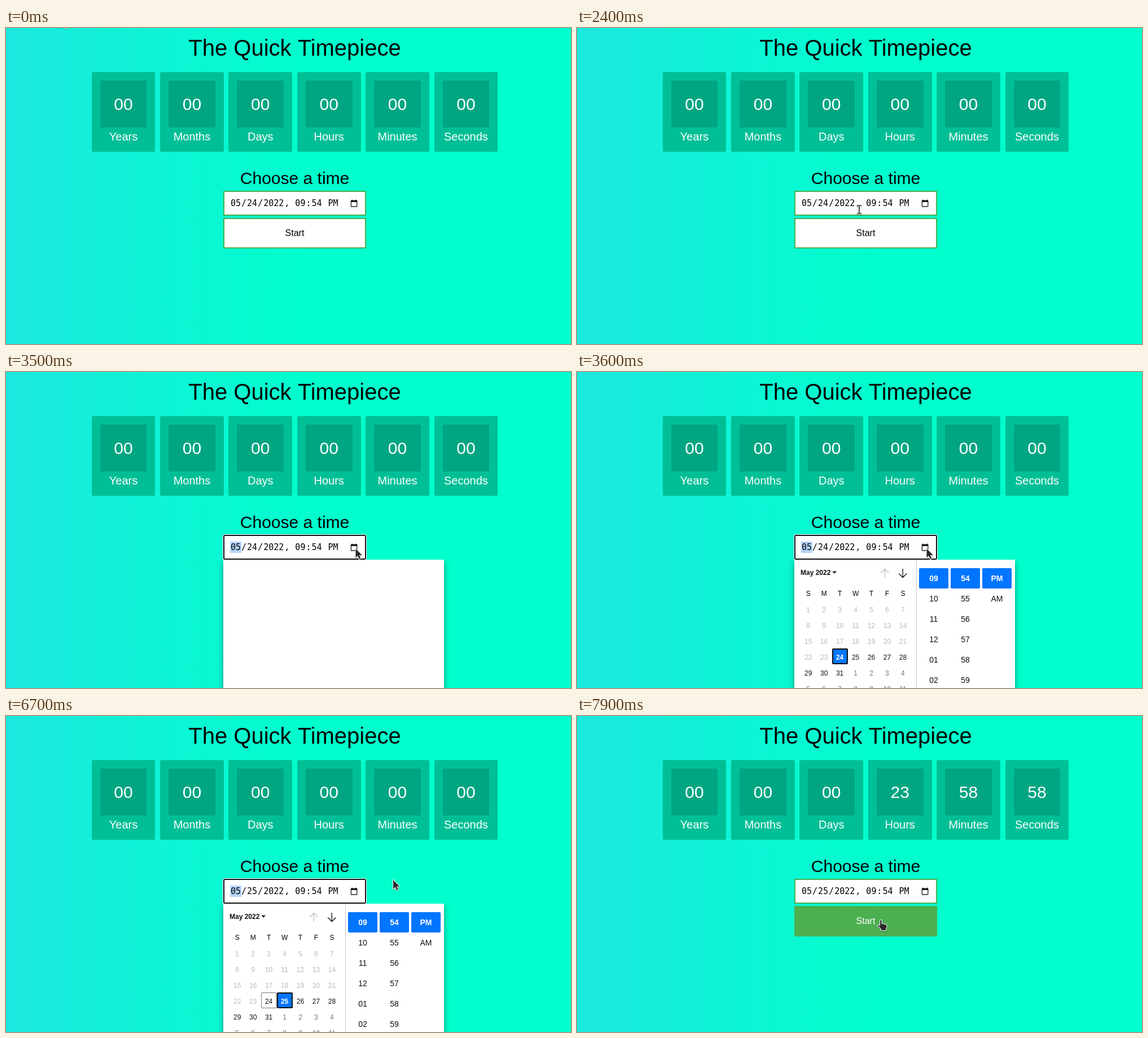
An HTML page with a canvas that plays this animation: 1001 px wide and 559 px high, repeating every 8 s.

```html
<!DOCTYPE html>
<html lang="en">
<head>
<meta charset="utf-8">
<title>Countdown page</title>
<style>
html, body { margin: 0; width: 100%; height: 100%; overflow: hidden; background: #00ffcc; }
canvas { display: block; }
</style>
</head>
<body>
<canvas id="stage" width="1001" height="559"></canvas>
<script>
const ctx = document.getElementById('stage').getContext('2d');
const LOOP = 8000, STEP = 100;
const SANS = '"Liberation Sans", Arial, sans-serif';
const MONO = '"DejaVu Sans Mono", monospace';
const GREEN = '#4caf50', BLUE = '#0075ff', INK = '#101010';

// Pointer path: time, x, y. Equal neighbours mean a pause.
const path = [
  [0, 98.5, -17.7], [700, 98.5, -17.7], [1100, 240, 118], [1500, 401, 278.5],
  [1600, 416, 300], [2000, 437, 321], [2200, 437, 321], [2400, 500, 321],
  [2800, 500, 321], [2900, 619.5, 312.5], [4200, 619.5, 312.5], [4300, 623, 320],
  [4600, 570, 430], [4900, 490.5, 505.5], [6000, 490.5, 505.5], [6700, 686, 290],
  [7000, 686, 290], [7100, 655, 318], [7200, 543, 363], [7300, 539, 361], [LOOP, 539, 361]
];

function pointerAt(t) {
  const i = path.findIndex(p => p[0] > t);
  const [t0, x0, y0] = path[i - 1], [t1, x1, y1] = path[i];
  const k = (t - t0) / (t1 - t0);
  return { x: x0 + (x1 - x0) * k, y: y0 + (y1 - y0) * k };
}

// The CSS "ease" curve, cubic-bezier(.25, .1, .25, 1).
function ease(x) {
  if (x <= 0) return 0;
  if (x >= 1) return 1;
  let lo = 0, hi = 1;
  const bez = (s, a, b) => 3 * s * (1 - s) ** 2 * a + 3 * s * s * (1 - s) * b + s ** 3;
  for (let n = 0; n < 20; n++) {
    const mid = (lo + hi) / 2;
    if (bez(mid, .25, .25) < x) lo = mid; else hi = mid;
  }
  return bez(lo, .1, 1);
}

const mix = (a, b, k) => `rgb(${a.map((v, i) => Math.round(v + (b[i] - v) * k)).join()})`;
const two = n => String(n).padStart(2, '0');

function box(x, y, w, h, color, r = 0) {
  ctx.fillStyle = color;
  ctx.beginPath();
  ctx.roundRect(x, y, w, h, r);
  ctx.fill();
}

function text(str, x, y, size, color = '#000', align = 'center', family = SANS, weight = '') {
  ctx.font = `${weight} ${size}px ${family}`;
  ctx.textAlign = align;
  ctx.fillStyle = color;
  ctx.fillText(str, x, y);
}

function drawPage(t) {
  const sky = ctx.createLinearGradient(0, 0, 550, 0);
  sky.addColorStop(0, '#1ce8df');
  sky.addColorStop(1, '#00ffcc');
  box(0, 0, 1001, 559, sky);
  text('The Quick Timepiece', 511.5, 49, 40);

  const labels = ['Years', 'Months', 'Days', 'Hours', 'Minutes', 'Seconds'];
  const values = t >= 7900 ? [0, 0, 0, 23, 58, 58] : [0, 0, 0, 0, 0, 0];
  labels.forEach((label, i) => {
    const x = 151.65 + 121.37 * i;
    const left = Math.round(x), right = Math.round(x + 112.8);
    const inL = Math.round(x + 15), inR = Math.round(x + 97.8);
    box(left, 78, right - left, 141, '#00bf96', 3);
    box(inL, 93, inR - inL, 83, '#00a582', 3);
    text(two(values[i]), x + 56.4, 145, 30, '#fff');
    text(label, x + 56.4, 199, 20, '#fff');
  });
  text('Choose a time', 511.5, 276, 30);
}

const calendarIcon = new Path2D('M20 3h-1V1h-2v2H7V1H5v2H4c-1.1 0-2 .9-2 2v16c0 1.1.9 2 2 2h16c1.1 0 2-.9 2-2V5c0-1.1-.9-2-2-2zM20 21H4V8h16z');

function drawInput(t) {
  const focused = t >= 3400 && t < 7800;
  if (focused) {
    box(384, 287, 255, 46, '#fff', 4);
    box(385, 288, 253, 44, INK, 3);
    box(387, 290, 249, 40, '#fff', 1);
    box(397, 300, 20, 20, '#b3d4fc');
  } else {
    box(385, 288, 253, 44, GREEN);
    box(387, 290, 249, 40, '#fff');
  }

  // Each editable field has one pixel of padding on both sides.
  const day = t >= 5400 ? '25' : '24';
  let x = 397;
  for (const part of ['05', '/', day, '/', '2022', ', ', '09', ':', '54', ' ', 'PM']) {
    const pad = /\w/.test(part) ? 1 : 0;
    text(part, x + pad, 315, 15, '#000', 'left', MONO);
    x += ctx.measureText(part).width + 2 * pad;
  }

  ctx.save();
  ctx.translate(609.6, 303);
  ctx.scale(.583, .583);
  ctx.fillStyle = '#000';
  ctx.fill(calendarIcon, 'evenodd');
  ctx.restore();
}

function drawButton(t) {
  const k = ease((t - 7200) / 400);
  box(385, 336, 253, 54, GREEN);
  box(387, 338, 249, 50, mix([255, 255, 255], [76, 175, 80], k));
  text('Start', 511.5, 368, 16, mix([0, 0, 0], [255, 255, 255], k));
}

function drawArrow(x, color, dir) {
  ctx.strokeStyle = color;
  ctx.lineWidth = 1.3;
  ctx.beginPath();
  ctx.moveTo(x, 356 - 8 * dir);
  ctx.lineTo(x, 356 + 7.5 * dir);
  ctx.moveTo(x - 7, 356 + .5 * dir);
  ctx.lineTo(x, 356 + 7.5 * dir);
  ctx.lineTo(x + 7, 356 + .5 * dir);
  ctx.stroke();
}

function drawDays(t, pointer) {
  const picked = t >= 5400 ? 25 : 24;
  [...'SMTWTFS'].forEach((d, i) => text(d, 409.7 + 27.95 * i, 395.5, 12));
  for (let n = 1; n <= 42; n++) {
    const col = (n - 1) % 7, row = Math.floor((n - 1) / 7);
    const cx = 409.7 + 27.95 * col, cy = 420 + 28 * row;
    const left = Math.round(cx - 14), top = cy - 15;
    const hover = n >= 24 && Math.abs(pointer.x - cx) < 14 && Math.abs(pointer.y - cy) < 14;
    let color = n < 24 ? '#bababa' : n > 31 ? '#757575' : INK;
    if (n === picked) {
      box(left, top, 28, 28, INK, 2);
      box(left + 2, top + 2, 24, 24, BLUE);
      color = '#fff';
    } else if (n === 24) {
      box(left, top, 28, 28, '#767676', 2);
      box(left + 1, top + 1, 26, 26, '#fff', 1);
    } else if (hover) {
      box(left, top, 28, 28, '#e8e8e8', 2);
    }
    text(n > 31 ? n - 31 : n, cx, cy + 4.5, 12, color, 'center', SANS, n === picked ? 'bold' : '');
  }
}

function drawTimes() {
  const columns = [
    ['09', '10', '11', '12', '01', '02'],
    ['54', '55', '56', '57', '58', '59'],
    ['PM', 'AM']
  ];
  columns.forEach((items, c) => {
    const x = 606 + 56 * c;
    box(x, 347, 52, 36, BLUE, 2);
    items.forEach((item, r) => {
      text(item, x + 26, 370 + 36 * r, 14, r ? INK : '#fff', 'center', SANS, r ? '' : 'bold');
    });
  });
}

function drawPicker(t, pointer) {
  if (t < 3500 || t >= 6800) return;
  ctx.save();
  ctx.beginPath();
  ctx.rect(370, 332, 430, 227);
  ctx.clip();
  ctx.shadowColor = 'rgba(0,0,0,.4)';
  ctx.shadowBlur = 10;
  ctx.shadowOffsetY = 4;
  box(385, 332, 391, 260, '#fff');
  ctx.restore();
  // The panel opens blank, its content follows one step later.
  if (t < 3600) return;
  box(601, 332, 1, 227, '#c4c4c4');
  text('May 2022', 396, 359, 12, INK, 'left', SANS, 'bold');
  ctx.beginPath();
  ctx.moveTo(452.5, 352.5);
  ctx.lineTo(460, 352.5);
  ctx.lineTo(456.2, 356.7);
  ctx.fill();
  drawArrow(545.3, '#bcbcbc', -1);
  drawArrow(577.2, INK, 1);
  drawDays(t, pointer);
  drawTimes();
}

const shapes = {
  arrow: new Path2D('M0 0V16L3.7 12.6L6.2 18.3L8.8 17.2L6.3 11.6H11.3Z'),
  beam: new Path2D('M-4 -8H-1L0 -7L1 -8H4V-6.5H1.5L.8 -5.5V5.5L1.5 6.5H4V8H1L0 7L-1 8H-4V6.5H-1.5L-.8 5.5V-5.5L-1.5 -6.5H-4Z'),
  hand: new Path2D('M-2 1Q-2 0 -.8 0T.6 1V7L2 6.6L4 7.2L6 7.4L8 8.2Q9.5 8.6 9.5 10V13L8 16V18H0V16L-3 12.5L-6 11Q-6.5 9 -4.5 9L-2 10.5Z')
};

function drawPointer(t, { x, y }) {
  const kind = t >= 7200 ? 'hand' : t >= 1600 && t < 2900 ? 'beam' : 'arrow';
  const shape = shapes[kind];
  ctx.save();
  ctx.translate(x, y);
  ctx.lineJoin = 'round';
  ctx.lineWidth = 2;
  ctx.strokeStyle = '#fff';
  ctx.shadowColor = 'rgba(0,0,0,.3)';
  ctx.shadowBlur = 2;
  ctx.shadowOffsetY = 1;
  ctx.stroke(shape);
  ctx.shadowColor = 'transparent';
  ctx.fillStyle = '#2a2a2a';
  ctx.fill(shape);
  ctx.restore();
}

function render(now) {
  const t = Math.floor((now % LOOP) / STEP) * STEP;
  const pointer = pointerAt(t);
  drawPage(t);
  drawInput(t);
  drawButton(t);
  drawPicker(t, pointer);
  drawPointer(t, pointer);
}

const start = performance.now();
function tick() {
  render(performance.now() - start);
  requestAnimationFrame(tick);
}
tick();
</script>
</body>
</html>
```
